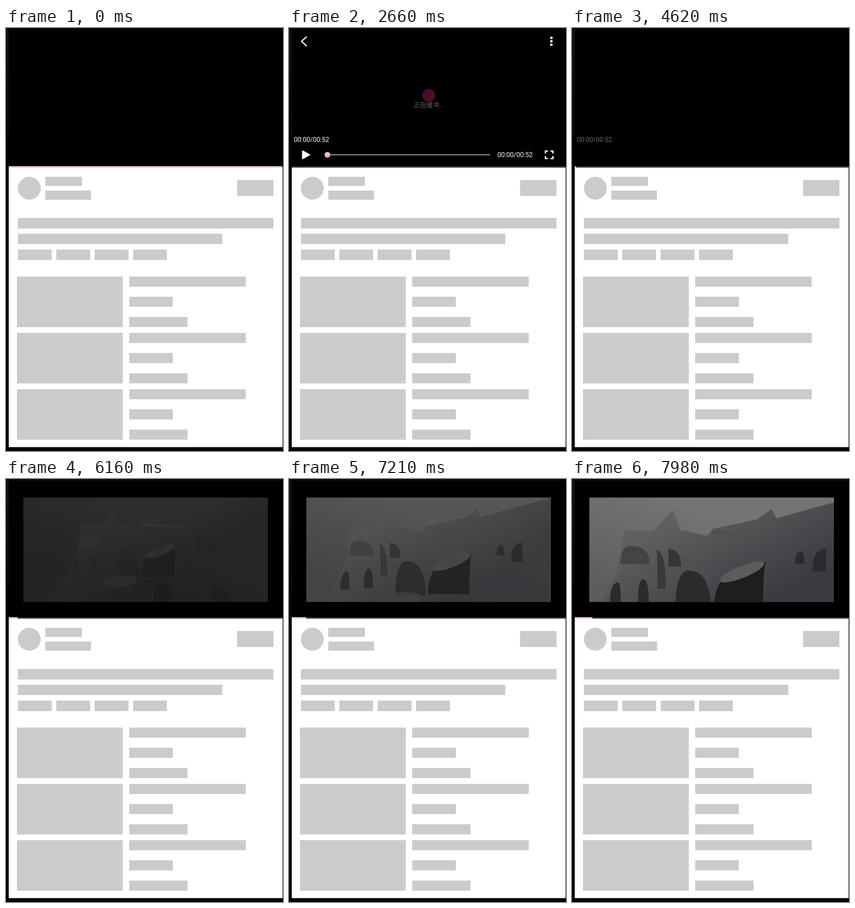
Write an HTML page with a canvas that moves like this. It is 606 by 924 pixels and loops after 8 s.

```html
<!DOCTYPE html>
<html lang="zh-CN">
<head>
<meta charset="utf-8">
<title>Video player</title>
<style>
html, body { margin: 0; width: 100%; height: 100%; overflow: hidden; background: #000; }
canvas { display: block; }
</style>
</head>
<body>
<canvas id="stage" width="606" height="924"></canvas>
<script>
const LOOP = 8000, TICK = 70;
const PINK = '#f5b9c5', GREY = '#cbcbcb';
const ctx = document.getElementById('stage').getContext('2d');

const clamp = v => Math.max(0, Math.min(1, v));

function rect(x, y, w, h, color) {
  ctx.fillStyle = color;
  ctx.fillRect(x, y, w, h);
}

function oval(x, y, rx, ry, color, turn = 0) {
  ctx.fillStyle = color;
  ctx.beginPath();
  ctx.ellipse(x, y, rx, ry, turn, 0, Math.PI * 2);
  ctx.fill();
}

const disc = (x, y, r, color) => oval(x, y, r, r, color);

function trace(points) {
  ctx.beginPath();
  for (let i = 0; i < points.length; i += 2) ctx.lineTo(points[i], points[i + 1]);
}

function stroke(color, width, ...points) {
  trace(points);
  ctx.strokeStyle = color;
  ctx.lineWidth = width;
  ctx.stroke();
}

function label(text, x, y, size) {
  ctx.font = `${size}px Roboto, "Noto Sans CJK SC", "Noto Sans CJK", sans-serif`;
  ctx.fillStyle = '#fff';
  ctx.fillText(text, x, y);
}

function gradient(x0, y0, x1, y1, from, to) {
  const g = ctx.createLinearGradient(x0, y0, x1, y1);
  g.addColorStop(0, from);
  g.addColorStop(1, to);
  return g;
}

function withAlpha(a, draw) {
  if (a <= 0) return;
  ctx.save();
  ctx.globalAlpha = a;
  draw();
  ctx.restore();
}

// Opacity rising from `start` and falling from `end` over a number of ticks
function visible(t, start, end, up, down) {
  const rise = (t - start + TICK) / (up * TICK);
  const fall = 1 - (t - end + TICK) / (down * TICK);
  return clamp(Math.min(rise, fall));
}

function page() {
  rect(0, 0, 606, 924, '#040404');
  rect(0, 0, 6, 240, gradient(0, 0, 0, 240, '#131313', '#060707'));
  rect(0, 0, 606, 4, '#0c0b0c');
  rect(6, 4, 600, 298, '#000');
  rect(6, 305, 599, 610.5, '#fff');
  disc(51, 350, 25, GREY);
  rect(86, 325, 80, 20, GREY);
  rect(86, 355, 100, 20, GREY);
  rect(505.5, 332, 79.5, 35, GREY);
  rect(26, 415, 559, 23, GREY);
  rect(26, 449.5, 559 * 0.8, 22.5, GREY);
  for (let i = 0; i < 4; i++) rect(26 + 84 * i, 484, 74, 23, GREY);
  for (let y = 543; y < 800; y += 123) {
    rect(24, y, 231.5, 110.5, GREY);
    rect(269.5, y, 255, 22, GREY);
    rect(269.5, y + 44, 95.5, 22, GREY);
    rect(269.5, y + 88.2, 127.5, 22, GREY);
  }
}

function rock(x, top, w, h, lean, color = '#2b2b2d') {
  const left = x - w / 2, right = x + w / 2;
  ctx.fillStyle = color;
  ctx.beginPath();
  ctx.moveTo(left, top + h);
  ctx.quadraticCurveTo(left, top, x + lean, top);
  ctx.quadraticCurveTo(right, top, right, top + h);
  ctx.fill();
}

// Snowy ridge, slowly zoomed while it comes out of the dark
function mountain(t, light) {
  const zoom = Math.exp(0.000222 * (t - 7980));
  ctx.beginPath();
  ctx.rect(38, 40.5, 535, 228);
  ctx.clip();
  ctx.translate(270, 68);
  ctx.scale(zoom, zoom);
  ctx.translate(-270, -68);
  rect(-300, -50, 1300, 600, gradient(200, 40, 120, 260, '#747474', '#5c5d5e'));

  const land = () => trace([-40, 470, 98, 205, 114, 113, 178, 113, 221, 68, 236, 111,
    296, 124, 308, 109, 405, 88, 437, 66, 447, 86, 540, 60, 1000, -60, 1000, 550]);
  land();
  ctx.fillStyle = gradient(250, 70, 370, 290, '#606062', '#3c3b40');
  ctx.fill();
  stroke('#505052', 9, 308, 116, 442, 122);

  rock(138, 146, 64, 40, -10, '#444446');
  rock(196, 155, 18, 85, -12, '#39393b');
  rock(225, 153, 28, 38, -14, '#353537');
  rock(95, 226, 24, 48, 6);
  rock(156, 219, 24, 52, 0);
  rock(265, 200, 78, 90, -10);
  rock(364, 182, 108, 104, 62, '#1e1e20');
  rock(498, 158, 20, 27, 3);
  rock(541, 152, 30, 50, 14);
  rock(378, 308, 62, 70, 4, '#1e1e20');
  rock(570, 318, 60, 60, -18, '#1e1e20');
  oval(372, 203, 52, 13, '#5c5c5e', -0.38);
  oval(240, 300, 56, 19, '#4a4a4c', -0.1);

  // The land stays darker than the sky until the light is full
  land();
  ctx.fillStyle = `rgba(0, 0, 0, ${0.42 * (1 - light)})`;
  ctx.globalAlpha = 1;
  ctx.fill();
}

function controls(progress, clock) {
  ctx.lineCap = ctx.lineJoin = 'round';
  stroke('#fff', 2.6, 38, 19.5, 27.5, 29, 38, 39);
  for (const dy of [-7.5, 0, 7.5]) disc(574, 29 + dy, 2.8, '#fff');
  stroke('#fff', 3, 30, 269, 44.5, 277, 30, 285, 30, 269);
  ctx.fillStyle = '#fff';
  ctx.fill();
  ctx.lineCap = 'butt';
  ctx.lineJoin = 'miter';
  for (const sx of [-1, 1]) for (const sy of [-1, 1]) {
    const x = 569.2 + 8.2 * sx, y = 277 + 8.2 * sy;
    stroke('#fff', 2.8, x - 5.5 * sx, y, x, y, x, y - 5.5 * sy);
  }
  const knob = 84 + 353.5 * progress;
  rect(84, 276, 356, 2, '#a3a3a3');
  rect(84, 276, knob - 84, 2, PINK);
  disc(knob, 277, 6.2, PINK);
  label(clock, 456, 282.1, 14.3);
}

function bottomBar(t) {
  rect(6, 302, 600, 3, '#3d3739');
  const steps = Math.floor((t - 4550) / 220);
  const width = t < 2100 ? 598 : t < 4550 ? 0 : 2.6 + 2.4 * steps;
  rect(6, 301.7, width, 3.3, '#f2c0ca');
}

function draw(t) {
  const rewound = t >= 2100;
  const light = clamp((t - 5000) / 2980);
  page();
  withAlpha(light, () => mountain(t, light));
  bottomBar(t);
  withAlpha(visible(t, 1470, 3570, 5, 5), () =>
    controls(rewound ? 0 : 1, rewound ? '00:00/00:52' : '00:52/00:52'));
  withAlpha(visible(t, 2100, 4480, 5, 5), () => label('00:00/00:52', 10.7, 248.6, 14.3));
  withAlpha(visible(t, 2520, 4200, 8, 1), () => {
    disc(306, 147, 14, '#b9247c');
    label('正在缓冲...', 272.5, 173, 14);
  });
}

function frame() {
  const t = performance.now() % LOOP;
  draw(Math.floor(t / TICK) * TICK);
  requestAnimationFrame(frame);
}
frame();
</script>
</body>
</html>
```
